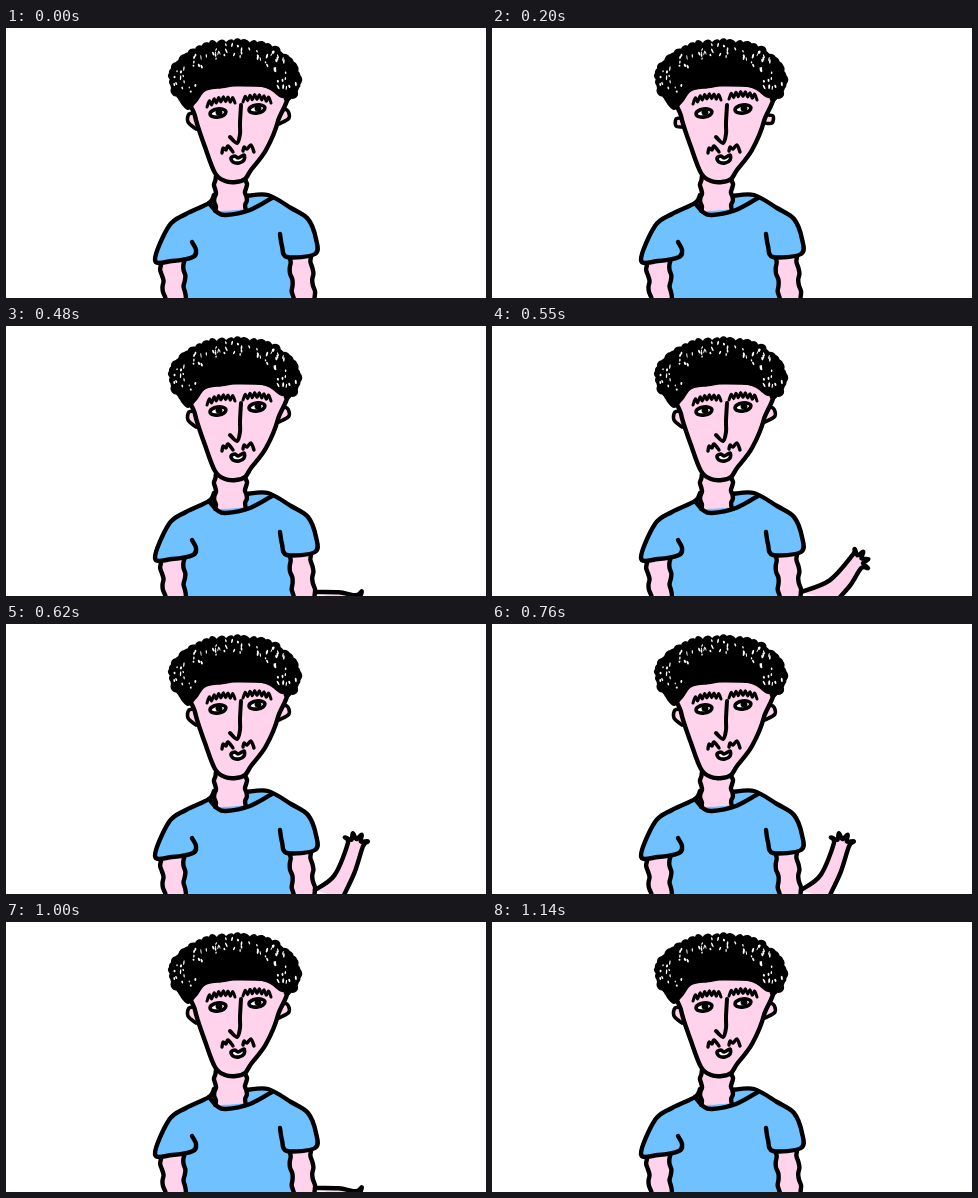
These frames come from a looping animation (480x270 px, 1570 ms). An HTML page with a canvas:

```html
<!DOCTYPE html>
<html lang="en">
<head>
<meta charset="utf-8">
<title>Waving man</title>
<style>
html, body { margin: 0; width: 100%; height: 100%; overflow: hidden; background: #fff; }
canvas { display: block; width: 480px; height: 270px; }
</style>
</head>
<body>
<canvas id="stage"></canvas>
<script>
const canvas = document.getElementById('stage');
const ctx = canvas.getContext('2d');
const ratio = window.devicePixelRatio || 1;
canvas.width = 480 * ratio;
canvas.height = 270 * ratio;

const LOOP = 1570;
const SKIN = '#ffd3eb', SHIRT = '#6fc1ff', INK = '#000', WHITE = '#fff';

// hand centre and the direction (degrees) the fingers point
const HANDS = {
  low: [348, 277, 0],
  mid: [363, 237, -35],
  up: [349, 223, -80],
  tilt: [346, 223, -92]
};
const WAVE = [
  [0, ''], [480, 'low'], [550, 'mid'], [620, 'up'], [690, 'tilt'],
  [760, 'up'], [930, 'mid'], [1000, 'low'], [1070, '']
];

const points = text => text.trim().split(/\s+/).map(p => p.split(',').map(Number));
const mix = (a, b, k) => a + (b - a) * k;
const range = (n, make) => Array.from({ length: n }, (_, i) => make(i));

function polar(cx, cy, degrees, rx, ry = rx) {
  const a = degrees * Math.PI / 180;
  return [cx + Math.cos(a) * rx, cy + Math.sin(a) * ry];
}

function seeded(seed) {
  return () => (seed = (seed * 16807) % 2147483647) / 2147483647;
}

// smooth path through points
function curve(list, closed = false) {
  const p = typeof list === 'string' ? points(list) : list;
  const n = p.length, path = new Path2D();
  const at = i => closed ? p[(i + n) % n] : p[Math.max(0, Math.min(n - 1, i))];
  path.moveTo(...p[0]);
  for (let i = 0; i < (closed ? n : n - 1); i++) {
    const [a, b, c, d] = [at(i - 1), at(i), at(i + 1), at(i + 2)];
    path.bezierCurveTo(
      b[0] + (c[0] - a[0]) / 6, b[1] + (c[1] - a[1]) / 6,
      c[0] - (d[0] - b[0]) / 6, c[1] - (d[1] - b[1]) / 6, c[0], c[1]);
  }
  if (closed) path.closePath();
  return path;
}

function oval(x, y, rx, ry, turn = 0) {
  const path = new Path2D();
  path.ellipse(x, y, rx, ry, turn, 0, 7);
  return path;
}

const fill = (path, color) => { ctx.fillStyle = color; ctx.fill(path); };
function ink(path, width = 4.4) {
  ctx.lineWidth = width;
  ctx.strokeStyle = INK;
  ctx.stroke(path);
}

// shaky, nearly upright line
const shaky = (x0, y0, x1, y1, phase) => range(9, i => [
  mix(x0, x1, i / 8) + 1.1 * Math.sin(i * 1.8 + phase), mix(y0, y1, i / 8)
]);

function limb(left, right) {
  const area = curve([...left, ...right.slice().reverse()], true);
  return { area, edges: [curve(left), curve(right)] };
}
const leftArm = limb(shaky(154, 231, 159, 275, 1), shaky(178, 231, 179, 275, 2));
const rightArm = limb(shaky(283, 228, 288, 275, 0), shaky(305, 228, 309, 275, 3));
const neck = limb(shaky(209, 148, 209, 183, 1), shaky(240, 148, 240, 181, 4));

const torso = curve('205,172 265,170 280,215 288,272 178,272 183,215', true);
const sleeves = [
  '208,167 203,175 180,186 163,198 149,232 166,233 187,229 190,222 186,214',
  '241,168 262,167 285,180 302,191 310,211 309,226 281,229 276,218 274,206'
].map(s => curve(s));
const collar = curve('203,175 211,184 220,187 244,182 266,170');

function makeForearm([x, y, aim]) {
  const fan = range(9, i => polar(x, y, aim - 75 + i * 18.75, i % 2 ? 14 : 8));
  const wrist = fan[0], heel = fan[8];
  const base = [336 + (x - 349) * 0.6, 275];
  const inner = [mix(309, wrist[0], 0.5) + 3, mix(265, wrist[1], 0.5) + 0.2 * (265 - wrist[1])];
  const outer = [mix(heel[0], base[0], 0.5) + 2, mix(heel[1], base[1], 0.5)];
  return curve([[309, 266], inner, ...fan, outer, base]);
}
const forearms = {};
for (const pose in HANDS) forearms[pose] = makeForearm(HANDS[pose]);

const face = curve(`187,60 189,88 199,119 209,145 219,153 230,154 239,151
  245,142 260,122 272,93 276,60`, true);
const ears = {
  wide: ['190,85 183,86 182,94 190,101', '274,82 281,82 283,90 273,96'],
  small: ['190,90 184,91 184,98 190,99', '274,87 281,88 280,95 272,95']
};
for (const kind in ears) ears[kind] = ears[kind].map(s => curve(s));

function makeBrow(x0, y0, x1, y1) {
  return curve(range(13, i => {
    const k = i / 12;
    return [mix(x0, x1, k), mix(y0, y1, k) - 3 * Math.sin(Math.PI * k) + (i % 2 ? 0 : 5)];
  }));
}
const brows = [makeBrow(201, 74, 229, 70), makeBrow(237, 69, 265, 70)];
const eyes = [[212, 85], [251, 81]];
const nose = curve('235,77 234,95 234,106 231,115 224,109');
const moustache = ['216,125 217,120 220,122 222,118 227,124', '237,123 238,119 241,121 245,117 248,124']
  .map(s => curve(s));
const mouth = curve('225,130 229,128 232,130 238,127 238,132 233,135 227,134', true);

const rand = seeded(47);
const crown = (degrees, k) => polar(229, 52, degrees, 61.5 * k, 36 * k);
const hairline = points('291,67 276,70 262,61 240,56 219,60 200,63 191,74 182,82 174,74');
const hair = curve([...range(25, i => crown(152 + i * 9.5, 1)), ...hairline], true);
const curls = range(34, i => {
  const [x, y] = crown(148 + i * 7.3, 0.98 + rand() * 0.04);
  return oval(x, y, 2.5 + rand() * 2, 3.5 + rand() * 2, rand() * 3);
});
const gaps = range(65, () => {
  const [x, y] = crown(155 + rand() * 230, 0.65 + rand() * 0.35);
  return oval(x, y, 0.5 + rand() * 0.6, 1 + rand() * 1.6, rand() - 0.5);
});

function drawBody(pose) {
  fill(torso, SHIRT);
  for (const arm of [leftArm, rightArm]) {
    fill(arm.area, SKIN);
    arm.edges.forEach(p => ink(p));
  }
  if (pose) {
    fill(forearms[pose], SKIN);
    ink(forearms[pose]);
  }
  sleeves.forEach(p => fill(p, SHIRT));
  fill(neck.area, SKIN);
  [...sleeves, ...neck.edges, collar].forEach(p => ink(p));
}

function drawHead(lift, earKind) {
  ears[earKind].forEach(p => { fill(p, SKIN); ink(p, 3.6); });
  fill(face, SKIN);
  ink(face);
  ctx.save();
  ctx.translate(0, lift);
  brows.forEach(p => ink(p, 3));
  ctx.restore();
  for (const [x, y] of eyes) {
    const lid = oval(x, y, 8, 4, -0.15);
    fill(lid, WHITE);
    fill(oval(x + 1, y - 0.5, 3.4, 3), INK);
    ink(lid, 3.6);
  }
  ink(nose, 4);
  moustache.forEach(p => ink(p, 3.4));
  fill(mouth, WHITE);
  ink(mouth, 3.6);
}

function drawHair() {
  fill(hair, INK);
  curls.forEach(p => { fill(p, INK); ink(p, 2.4); });
  gaps.forEach(p => fill(p, WHITE));
}

function draw(time) {
  const pose = WAVE.filter(step => step[0] <= time).pop()[1];
  const lift = time >= 130 && time < 480 ? -3 : 0;
  const earKind = time >= 200 && time < 340 ? 'small' : 'wide';
  ctx.setTransform(ratio, 0, 0, ratio, 0, 0);
  ctx.fillStyle = WHITE;
  ctx.fillRect(0, 0, 480, 270);
  ctx.lineCap = ctx.lineJoin = 'round';
  drawBody(pose);
  drawHead(lift, earKind);
  drawHair();
}

const start = performance.now();
function tick() {
  draw((performance.now() - start) % LOOP);
  requestAnimationFrame(tick);
}
tick();
</script>
</body>
</html>
```
